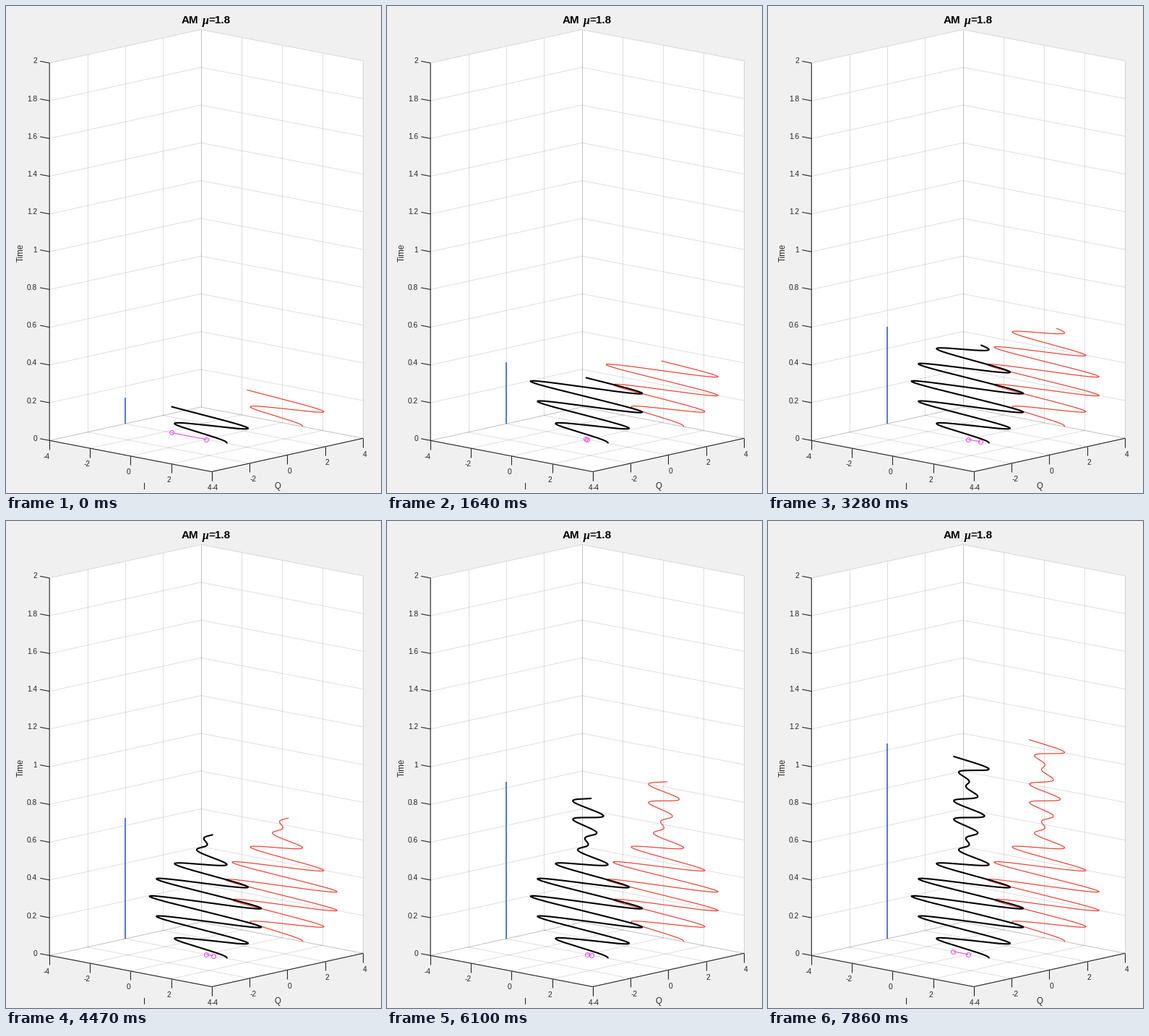
These frames come from a looping animation (519 px wide and 674 px high, 8000 ms). A matplotlib script:

```python
import numpy as np
import matplotlib.pyplot as plt
from matplotlib.animation import FuncAnimation

W, H, DPI = 519, 674, 64
PT = 72 / DPI  # points per pixel
LOOP, STEP = 8000, 40
MU, CARRIER = 1.8, 10
DARK, GRID = "#262626", (0.15, 0.15, 0.15, 0.15)

plt.rcParams["font.family"] = "Liberation Sans"
fig = plt.figure(figsize=(W / DPI, H / DPI), dpi=DPI, facecolor="#f0f0f0")
ax = fig.add_axes([0, 0, 1, 1])
ax.set_xlim(-0.5, W - 0.5)
ax.set_ylim(H - 0.5, -0.5)
ax.axis("off")


def project(i, q, t):
    """Orthographic view of (I, Q, time) in pixels."""
    x = 276.7 + 28.06 * i + 26.19 * q
    y = 599.3 + 5.4 * i - 5.78 * q - 261.2 * t
    return x, y


def line(pts, color, width=1.0, z=1):
    xs, ys = zip(*pts)
    return ax.plot(xs, ys, color=color, lw=width * PT, zorder=z,
                   solid_capstyle="butt")[0]


def label(x, y, s, size=10.2, ha="center", color=DARK, **kw):
    """Text vertically centred on y by its cap height."""
    ax.text(x, y + 0.35 * size, s, size=size * PT, ha=ha, va="baseline",
            color=color, **kw)


def signal(t):
    return (1 + MU * np.sin(2 * np.pi * t)) * np.cos(2 * np.pi * CARRIER * t)


# white walls and floor
outline = [project(*p) for p in ((-4, -4, 0), (4, -4, 0), (4, 4, 0),
                                 (4, 4, 2), (-4, 4, 2), (-4, -4, 2))]
ax.fill(*zip(*outline), color="white", lw=0, zorder=0)

# grid
for v in (-4, -2, 0, 2, 4):
    line([project(v, -4, 0), project(v, 4, 0)], GRID)
    line([project(v, 4, 0), project(v, 4, 2)], GRID)
    line([project(4, v, 0), project(-4, v, 0)], GRID)
    line([project(-4, v, 0), project(-4, v, 2)], GRID)
for t in np.linspace(0, 2, 11):
    line([project(-4, -4, t), project(-4, 4, t), project(4, 4, t)], GRID)

# axes, ticks and tick labels
line([project(-4, -4, 2), project(-4, -4, 0), project(4, -4, 0),
      project(4, 4, 0)], DARK, 1.1, 2)
for t in np.linspace(0, 2, 11):
    x, y = project(-4, -4, t)
    line([(x, y), (x - 13, y - 2.5)], DARK, 1.1, 2)
    label(42.5, y - 3, f"{t:.1f}".removesuffix(".0"), ha="right")
for v in (-4, -2, 0, 2, 4):
    for (x, y), ha in ((project(v, -4, 0), "right"),
                       (project(4, v, 0), "left")):
        line([(x, y), (x, y + 12.5)], DARK, 1.1, 2)
        label(x, y + 21.7, str(v), ha=ha)

label(191.5, 664, "I", 11.5)
label(375.5, 663.5, "Q", 11.5)
ax.text(23, 340.5, "Time", size=11.5 * PT, rotation=90, ha="center",
        va="baseline", rotation_mode="anchor", color=DARK)
label(242.5, 18.5, "AM", 15.2, "left", "black", weight="bold")
label(271, 18.5, "μ", 16, "left", "black", weight="bold", style="italic",
      family="Liberation Serif")
label(280, 18.5, "=1.8", 15.2, "left", "black", weight="bold")

# moving parts
blue = line([(0, 0), (0, 0)], "#1c54e3", 1.5, 3)
red = line([(0, 0), (0, 0)], "#ea3f33", 1.2, 3)
black = line([(0, 0), (0, 0)], "black", 2.1, 4)
phasor = line([(0, 0), (0, 0)], "#ee52fa", 1.1, 5)
phasor.set(marker="o", markersize=6 * PT, markerfacecolor="none",
           markeredgewidth=1.1 * PT)


def count_at(ms):
    """Index of the picture held at a given moment."""
    return int(np.interp(ms, [0, 1200, 4620, 7860, 8010], [0, 8, 31, 53, 54]))


def signal_time(k):
    return np.interp(k, [0, 5, 11, 22, 30, 41, 53],
                     [0.138, 0.220, 0.3255, 0.5125, 0.641, 0.831, 1.034])


def update(n):
    end = signal_time(count_at((n + 1) * STEP))
    t = np.linspace(0, end, int(end * 1000) + 1)
    i = signal(t)
    black.set_data(*project(i, 0, t))
    red.set_data(*project(i, 4, t))
    blue.set_data(*project(np.full(2, -4), 0, np.array([0, end])))
    phasor.set_data(*project(np.array([0, i[-1]]), 0, 0))
    return blue, red, black, phasor


anim = FuncAnimation(fig, update, frames=LOOP // STEP, interval=STEP,
                     repeat=True, repeat_delay=0, blit=False)
plt.show()
```
